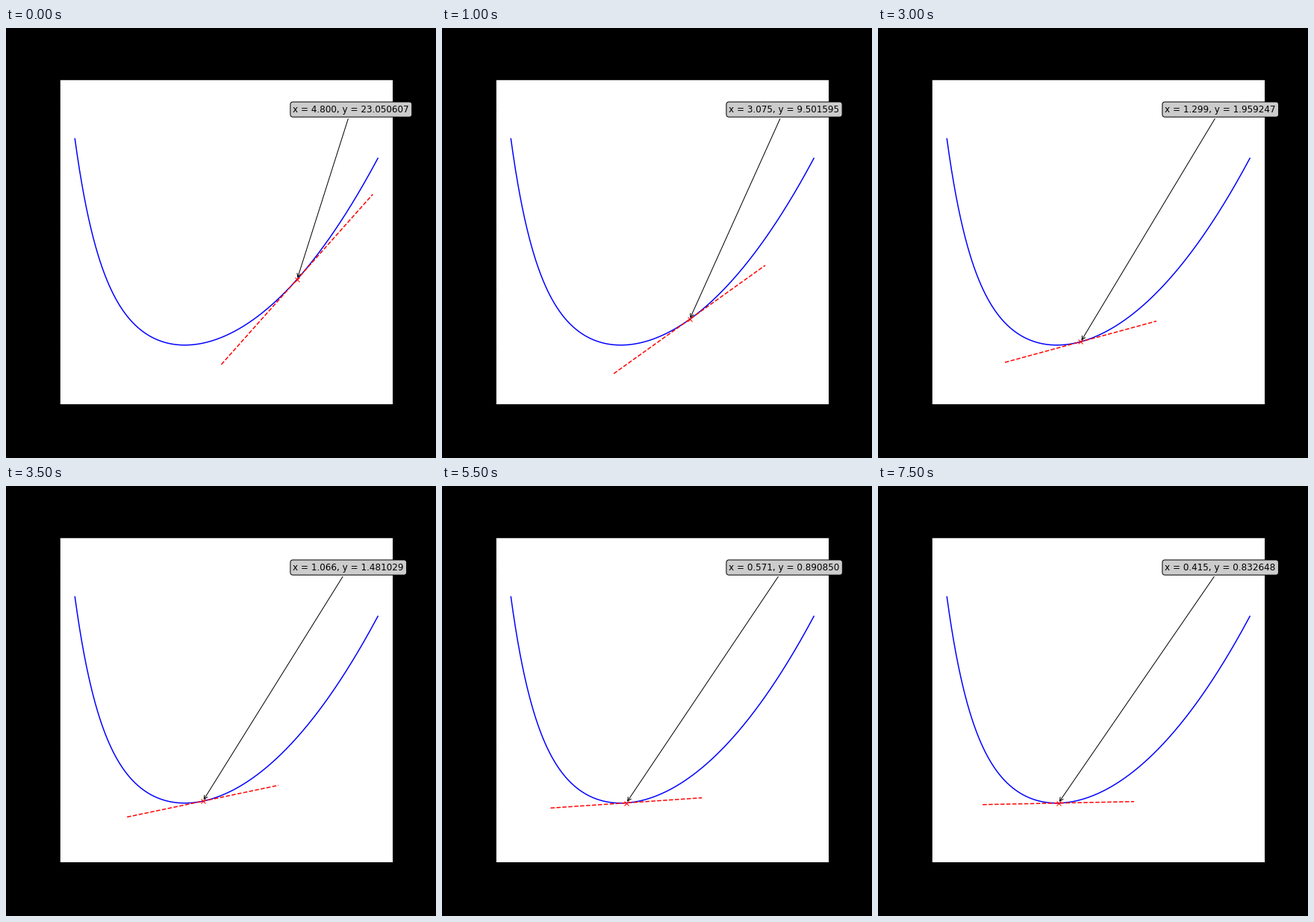
Animation of 576x576 px, one loop 8000 ms. Source, as a matplotlib script:

```python
import numpy as np
import matplotlib.pyplot as plt
from matplotlib.animation import FuncAnimation

START, RATE, STEPS, REACH = 6.0, 0.1, 16, 3.0


def f(x):
    return x**2 + np.exp(-x)


def slope(x):
    return 2 * x - np.exp(-x)


def descend():
    """Points visited by gradient descent."""
    path, x = [], START
    for _ in range(STEPS):
        x -= RATE * slope(x)
        path.append(x)
    return path


path = descend()

fig = plt.figure(figsize=(8, 8), dpi=72, facecolor="black")
ax = fig.add_axes([0.125, 0.125, 0.775, 0.755])

xs = np.linspace(-4, 8, 400)
ys = f(xs)
ax.plot(xs, ys, "b-", lw=1.5)
ax.set_xlim(-4.6, 8.6)
ax.set_ylim(ys.min() - 20, ys.max() + 20)

tangent, = ax.plot([], [], "r--", lw=1.5)
marker, = ax.plot([], [], "rx", ms=6)
note = ax.annotate(
    "", xy=(0, 0), xytext=(0.7, 0.9), textcoords="axes fraction", size=12,
    bbox=dict(boxstyle="round", fc="0.8"),
    arrowprops=dict(arrowstyle="->"))


def update(i):
    x = path[i]
    y = f(x)
    tx = np.array([x - REACH, x + REACH])
    tangent.set_data(tx, y + slope(x) * (tx - x))
    marker.set_data([x], [y])
    note.xy = (x, y)
    note.set_text(f"x = {x:.3f}, y = {y:.6f}")
    return tangent, marker, note


anim = FuncAnimation(fig, update, frames=STEPS, interval=500,
                     repeat=True, repeat_delay=0)
plt.show()
```
